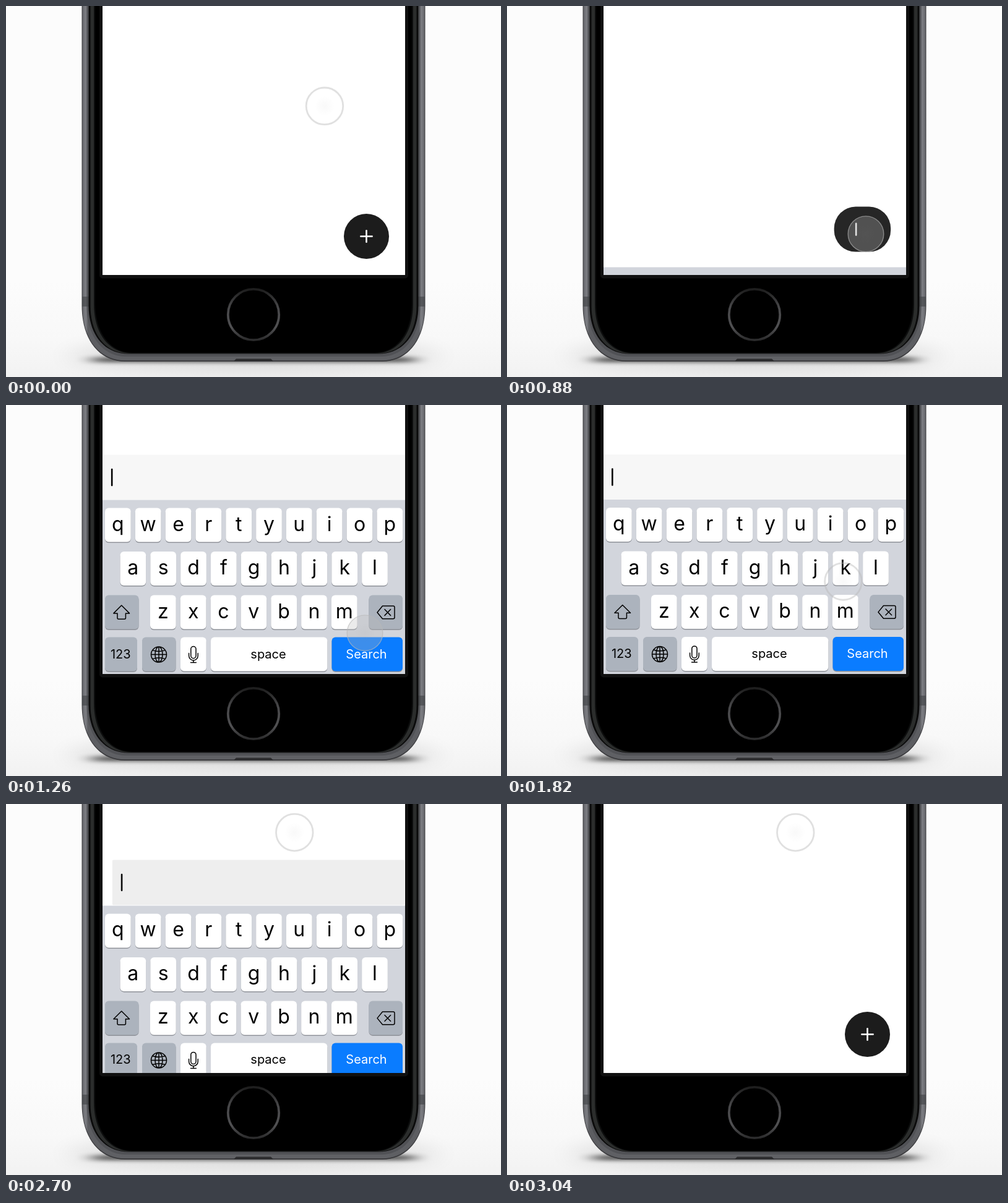
Animation, 800 px wide and 600 px high, one loop 3.72 s. Source, as an HTML page:

```html
<!DOCTYPE html>
<html lang="en">
<head>
<meta charset="utf-8">
<title>Button to search field</title>
<style>
  html, body { margin: 0; width: 100%; height: 100%; overflow: hidden; background: #fcfcfc; }
  svg { display: block; width: 100vw; height: 100vh; }
  text { font-family: Inter, Roboto, sans-serif; text-anchor: middle; }
  .icon { fill: none; stroke: #000; stroke-width: 1.5; stroke-linejoin: round; stroke-linecap: round; }
</style>
</head>
<body>
<svg viewBox="0 0 800 600">
  <defs>
    <linearGradient id="floor" x2="0" y2="1">
      <stop offset=".74" stop-color="#fcfcfc"/>
      <stop offset=".9" stop-color="#f8f8f8"/>
      <stop offset="1" stop-color="#f2f2f2"/>
    </linearGradient>
    <linearGradient id="metal" gradientUnits="userSpaceOnUse" x1="122.5" x2="677.5">
      <stop offset="0" stop-color="#4c4d51"/>
      <stop offset=".005" stop-color="#6f7075"/>
      <stop offset=".012" stop-color="#7d7e83"/>
      <stop offset=".018" stop-color="#5c5d61"/>
      <stop offset=".12" stop-color="#606165"/>
      <stop offset=".88" stop-color="#606165"/>
      <stop offset=".982" stop-color="#5c5d61"/>
      <stop offset=".988" stop-color="#7d7e83"/>
      <stop offset=".995" stop-color="#6f7075"/>
      <stop offset="1" stop-color="#4c4d51"/>
    </linearGradient>
    <linearGradient id="ring" x2="0" y2="1">
      <stop offset="0" stop-color="#1d1d1d"/>
      <stop offset=".35" stop-color="#464648"/>
      <stop offset=".75" stop-color="#505052"/>
      <stop offset="1" stop-color="#2b2b2c"/>
    </linearGradient>
    <radialGradient id="dot">
      <stop offset="0" stop-color="#808080" stop-opacity=".05"/>
      <stop offset="1" stop-color="#808080" stop-opacity="0"/>
    </radialGradient>
    <filter id="soft" x="-20%" y="-150%" width="140%" height="400%"><feGaussianBlur stdDeviation="22 14"/></filter>
    <filter id="tight" x="-20%" y="-300%" width="140%" height="700%"><feGaussianBlur stdDeviation="14 3"/></filter>
    <clipPath id="screen"><rect x="156" y="0" width="489" height="435"/></clipPath>
  </defs>
  <rect width="800" height="600" fill="url(#floor)"/>
  <g id="phone"></g>
  <g clip-path="url(#screen)">
    <rect x="156" width="489" height="435" fill="#fff"/>
    <rect id="field"/>
    <rect id="bar" x="572" y="371.2" width="21" height="2.6" rx="1.3" fill="#fff"/>
    <rect id="caret" rx="1.2"/>
    <g id="keys"></g>
    <g id="touch">
      <circle id="fill" r="29" fill="#bababa"/>
      <circle r="16" fill="url(#dot)"/>
      <circle id="rim" fill="none" stroke="#b7b7b7"/>
    </g>
  </g>
</svg>
<script>
const LOOP = 3720, OPEN = 860, CLOSE = 2681, DONE = 3040;
const $ = id => document.getElementById(id);
const clamp = v => Math.min(1, Math.max(0, v));
const mix = (a, b, k) => a + (b - a) * k;
const set = (id, attrs) => { for (const k in attrs) $(id).setAttribute(k, attrs[k]); };
const gray = v => `rgb(${[v, v, v].map(Math.round)})`;

// Phone outline: straight sides, rounded lower corners
function shell(left, bottom, turn, foot, fill) {
  const right = 800 - left, k = turn + (bottom - turn) * .6, c = left + (foot - left) * .4;
  return `<path fill="${fill}" d="M${left} -5V${turn}C${left} ${k} ${c} ${bottom} ${foot} ${bottom}
    H${800 - foot}C${800 - c} ${bottom} ${right} ${k} ${right} ${turn}V-5Z"/>`;
}

function phone() {
  const band = x => `<rect x="${x}" y="470" width="11" height="16" fill="#3f4043" opacity=".6"/>`;
  return `<ellipse cx="400" cy="566" rx="300" ry="26" fill="#000" opacity=".09" filter="url(#soft)"/>
    <rect x="140" y="568" width="520" height="8" rx="4" opacity=".65" filter="url(#tight)"/>`
    + shell(122.5, 575, 485, 192, '#39393c')
    + shell(123.3, 573.2, 485, 192, 'url(#metal)')
    + shell(130.5, 567, 485, 194, '#515256')
    + band(123) + band(666)
    + shell(133.5, 562.5, 485, 197, '#0b0b0b')
    + shell(136.5, 562, 485, 198, '#2b2d2c')
    + shell(142, 561.5, 482, 203, '#0d0e0e')
    + shell(144, 561, 480, 205, '#000')
    + `<path d="M368 574.5l4-4h56l4 4z" fill="#2d2d2f"/>
    <rect x="151" y="-10" width="499" height="450.5" rx="5" fill="#101010"/>
    <circle cx="400" cy="499" r="41.2" fill="#000" stroke="url(#ring)" stroke-width="3.8"/>`;
}

function key(x, y, w, fill = '#fff') {
  const box = (dy, f) => `<rect x="${x}" y="${y + dy}" width="${w}" height="55" rx="6" fill="${f}"/>`;
  return box(1.4, '#8f9299') + box(0, fill);
}
const label = (s, x, y, size, fill = '#000') =>
  `<text x="${x}" y="${y}" font-size="${size}" fill="${fill}">${s}</text>`;
const icon = d => `<path class="icon" d="${d}"/>`;

function keyboard() {
  const dim = '#acb3bd', wide = 41.7, pitch = 48.83;
  let out = '<rect x="156" y="153" width="489" height="290" fill="#d2d5dc"/>';
  [['qwertyuiop', 160, 166], ['asdfghjkl', 184.5, 236.5], ['zxcvbnm', 233, 307]].forEach(([row, x0, y]) =>
    [...row].forEach((ch, i) => {
      const x = x0 + i * pitch;
      out += key(x, y, wide) + label(ch, x + wide / 2, y + 37, 32);
    }));
  return out
    + key(160, 307, 54.5, dim)
    + icon('M186.7 323.5L199.5 336.3H193.4V343.6Q193.4 345.6 191.4 345.6H182Q180 345.6 180 343.6V336.3H173.9Z')
    + key(586.5, 307, 54.5, dim)
    + icon('M608.5 324.5H625.8Q628 324.5 628 326.7V343Q628 345.2 625.8 345.2H608.5L600 334.9ZM612 330L621.6 339.8M621.6 330L612 339.8')
    + key(160, 375, 52, dim) + label('123', 185.3, 409, 20)
    + key(220, 375, 54.5, dim)
    + icon('M234.5 403a12.5 12.5 0 1 0 25 0a12.5 12.5 0 1 0 -25 0M241 403a6 12.5 0 1 0 12 0a6 12.5 0 1 0 -12 0'
      + 'M247 390.5V415.5M234.5 403H259.5M237 396Q247 399.6 257 396M237 410Q247 406.4 257 410')
    + key(282, 375, wide)
    + icon('M298.8 394a4.1 4.1 0 0 1 8.2 0V405a4.1 4.1 0 0 1 -8.2 0ZM295.6 401V405a7.3 7.3 0 0 0 14.6 0V401M302.9 412.3V416M298.5 416H307.3')
    + key(331, 375, 188.3) + label('space', 424, 409, 20)
    + key(526.5, 375, 114.5, '#0a7cff') + label('Search', 582.5, 409, 20, '#fff');
}

// Share of the way left for a nearly critically damped spring
function spring(ms) {
  if (ms <= 0) return 1;
  const z = .92, wt = 15.7 * ms / 1000, q = Math.sqrt(1 - z * z);
  return Math.exp(-z * wt) * (Math.cos(q * wt) + z / q * Math.sin(q * wt));
}
function inOut(t, from, to, power) {
  const p = clamp((t - from) / (to - from));
  return p < .5 ? .5 * (2 * p) ** power : 1 - .5 * (2 - 2 * p) ** power;
}

function touchAt(t) {
  const back = t >= 1410;
  const kx = back ? 1 - inOut(t, 1420, 2420, 2) : inOut(t, -635, 740, 2);
  const ky = back ? 1 - inOut(t, 1420, 2420, 3) : inOut(t, -598, 740, 3);
  return [mix(466.3, 580, kx), mix(46, 368.7, ky)];
}

function draw(t) {
  const busy = t > OPEN && t < DONE;
  const e = !busy ? 0 : clamp(t < CLOSE ? 1 - spring(t - OPEN) : spring(t - CLOSE));
  const left = mix(546, 156, e), top = mix(336, 80, e), tall = mix(21, 28.5, e);
  set('field', {
    x: left, y: top, width: mix(619, 645, e) - left, height: 73,
    rx: mix(36.5, 0, e), fill: gray(mix(28, 247, e))
  });
  set('caret', {
    x: mix(582.5, 170.3, e) - 1.3, y: top + 36.5 - tall / 2, width: 2.6, height: tall,
    fill: gray(mix(255, 0, e))
  });
  set('bar', { visibility: busy ? 'hidden' : 'visible' });
  set('keys', { transform: `translate(0 ${282 * (1 - e)})` });

  const press = clamp((t - 540) / 120) * clamp((1560 - t) / 140);
  set('touch', { transform: `translate(${touchAt(t)})` });
  set('fill', { opacity: .29 * press });
  set('rim', { r: mix(29.8, 28.8, press), 'stroke-width': mix(2.8, 1.4, press), opacity: mix(.43, .6, press) });
}

$('phone').innerHTML = phone();
$('keys').innerHTML = keyboard();
const start = performance.now();
function tick() {
  draw((performance.now() - start) % LOOP);
  requestAnimationFrame(tick);
}
tick();
</script>
</body>
</html>
```
